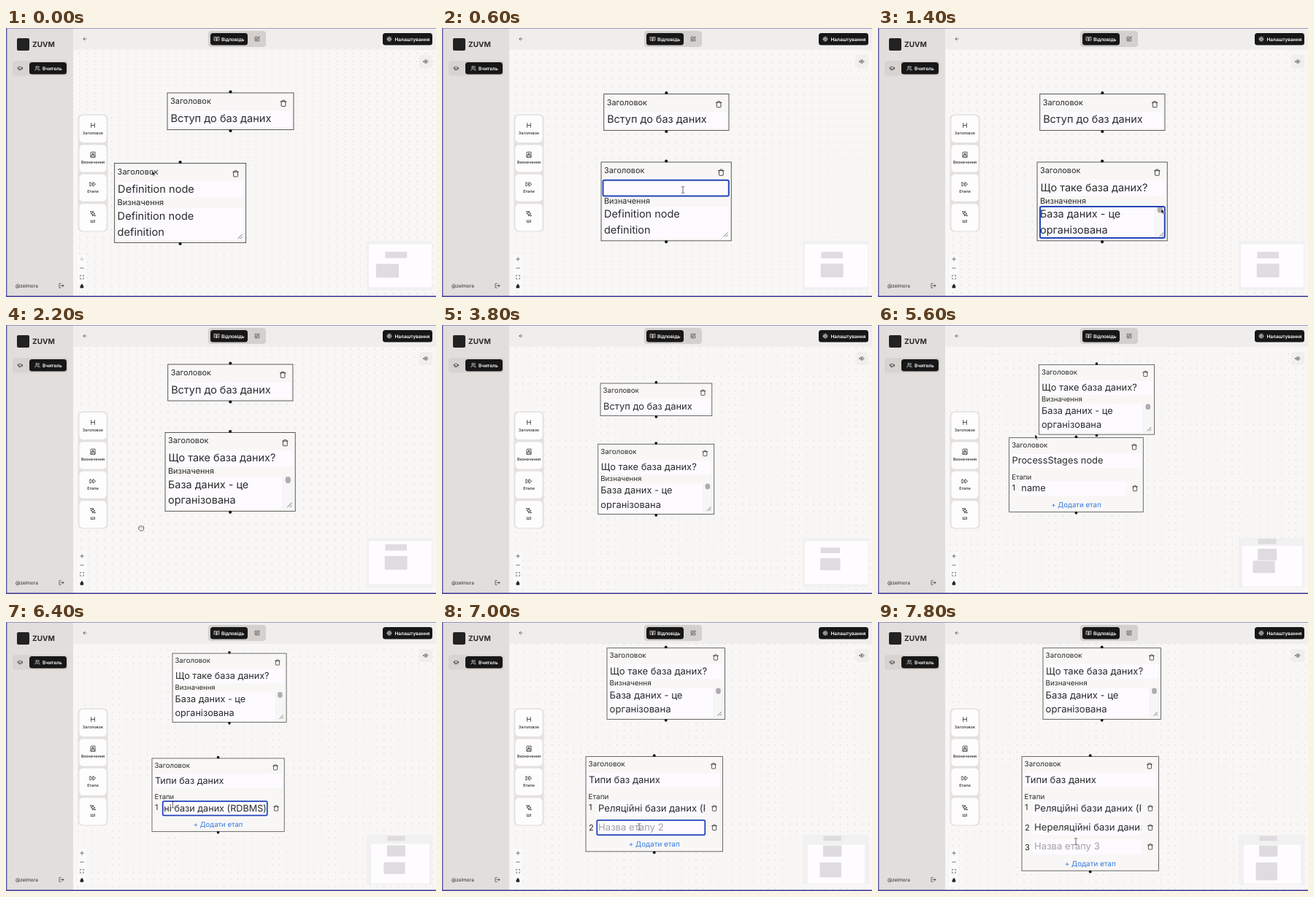
Write an HTML page that moves like this. It is 589 by 369 pixels and loops after 8 s.

```html
<!DOCTYPE html>
<html lang="uk">
<head>
<meta charset="utf-8">
<title>Node editor</title>
<style>
  html, body { margin: 0; width: 100%; height: 100%; overflow: hidden; background: #f8f7f6; }
  svg { display: block; }
  text { font-family: Inter, "Noto Sans", sans-serif; fill: #2a2a2a; white-space: pre; text-rendering: geometricPrecision; }
  .label { font-size: 11px; }
  .field { font-size: 14.6px; }
  .ui { font-size: 6.5px; font-weight: 600; }
  .tool { font-size: 5.5px; font-weight: 500; text-anchor: middle; }
</style>
</head>
<body>
<svg id="stage" width="589" height="369" viewBox="0 0 589 369">
  <defs>
    <pattern id="dots" width="11" height="11" patternUnits="userSpaceOnUse">
      <circle cx=".7" cy=".7" r=".55" fill="#b3b1b2"/>
    </pattern>
    <clipPath id="mapClip"><rect x="494" y="292" width="90" height="68"/></clipPath>
  </defs>
  <rect width="589" height="369" fill="#f8f7f6"/>
  <rect x="92" y="30" width="497" height="339" fill="url(#dots)"/>
  <g id="nodes"></g>
  <g id="chrome"></g>
  <g id="overlay"></g>
</svg>
<script>
const $ = id => document.getElementById(id);
const LOOP = 8000, STEP = 200;
const INK = '#222', FIELD = '#fdfbff', FOCUS = '#2444b8';

const circle = (x, y, r) => `M${x - r} ${y}a${r} ${r} 0 1 0 ${2 * r} 0a${r} ${r} 0 1 0 ${-2 * r} 0`;

// Icon outlines on a 24-unit grid
const ICONS = {
  back: 'M12 19l-7-7 7-7M19 12H5',
  heading: 'M6 12h12M6 20V4M18 20V4',
  definition: 'M4 19.5v-15A2.5 2.5 0 0 1 6.5 2H20v20H6.5a2.5 2.5 0 0 1 0-5H20M8 13l4-7 4 7M9 11h6',
  stages: 'M13 19l9-7-9-7zM2 19l9-7-9-7z',
  sparkles: 'M12 3l2 6 6 3-6 2-2 7-2-7-6-2 6-3zM5 3v4M3 5h4M19 17v4M17 19h4',
  cap: 'M22 10L12 5 2 10l10 5zM6 12v5c3 3 9 3 12 0M22 10v6',
  users: 'M16 21v-2a4 4 0 0 0-4-4H6a4 4 0 0 0-4 4v2M22 21v-2a4 4 0 0 0-3-4M16 3a4 4 0 0 1 0 8' + circle(9, 7, 4),
  book: 'M2 3h6a4 4 0 0 1 4 4v14a3 3 0 0 0-3-3H2zM22 3h-6a4 4 0 0 0-4 4v14a3 3 0 0 1 3-3h7zM6 8h2M6 12h2M16 8h2M16 12h2',
  edit: 'M12 3H5a2 2 0 0 0-2 2v14a2 2 0 0 0 2 2h14a2 2 0 0 0 2-2v-7M18.4 2.6a2 2 0 0 1 3 3L12 15l-4 1 1-4z',
  gear: circle(12, 12, 7) + circle(12, 12, 3) + 'M12 2v3M12 19v3M2 12h3M19 12h3M5 5l2 2M17 17l2 2M5 19l2-2M17 7l2-2',
  eye: 'M2 12s4-7 10-7 10 7 10 7-4 7-10 7-10-7-10-7z' + circle(12, 12, 3),
  logout: 'M9 21H5a2 2 0 0 1-2-2V5a2 2 0 0 1 2-2h4M16 17l5-5-5-5M21 12H9',
  plus: 'M4 12h16M12 4v16',
  minus: 'M4 12h16',
  expand: 'M3 8V3h5M16 3h5v5M21 16v5h-5M8 21H3v-5',
  lock: 'M5 11h14v10H5zM8 11V7a4 4 0 0 1 8 0v4',
  trash: 'M3 6h18M19 6v14a2 2 0 0 1-2 2H7a2 2 0 0 1-2-2V6M8 6V4a2 2 0 0 1 2-2h4a2 2 0 0 1 2 2v2'
};

const POINTERS = {
  arrow: '<path d="M0 0v6.5l1.5-1.4 1.1 2.3 1.1-.5-1-2.2h2z" fill="#111" stroke="#fff" stroke-width=".5"/>',
  hand: '<path d="M-3-1.5q0-2 1.5-1.5q1-1 2 0q1-1 2 .2q1.3-.3 1.2 1.3v2q-.4 3-3.2 3q-2.5 0-3.8-2.6q-.8-1.5.3-2.4z" fill="#fff" stroke="#333" stroke-width=".8"/><path d="M-1.5-1.5v1.5M.5-1.6v1.6M2.3-1.4v1.4" stroke="#333" stroke-width=".6"/>',
  ibeam: '<path d="M-2-4.5q2 0 2 1q0-1 2-1M-2 4.5q2 0 2-1q0 1 2 1M0-3.5v7" fill="none" stroke="#444" stroke-width=".8"/>',
  none: ''
};

const rect = (x, y, w, h, fill, rx = 0, extra = '') =>
  `<rect x="${x}" y="${y}" width="${w}" height="${h}" rx="${rx}" fill="${fill}" ${extra}/>`;
const text = (x, y, str, cls, extra = '') => `<text x="${x}" y="${y}" class="${cls}" ${extra}>${str}</text>`;
const icon = (name, cx, cy, size, color = INK, fill = 'none') =>
  `<path d="${ICONS[name]}" transform="translate(${cx - size / 2} ${cy - size / 2}) scale(${size / 24})"
    fill="${fill}" stroke="${color}" stroke-width="2" stroke-linecap="round" stroke-linejoin="round"/>`;

// Eased value of a list of [time, ...values] keys
function track(keys, t) {
  const next = keys.findIndex(key => key[0] > t);
  if (next < 0) return keys.at(-1).slice(1);
  if (next === 0) return keys[0].slice(1);
  const a = keys[next - 1], b = keys[next];
  const p = (t - a[0]) / (b[0] - a[0]), eased = p * p * (3 - 2 * p);
  return a.slice(1).map((v, i) => v + (b[i + 1] - v) * eased);
}

function typed(str, start, end, t, before = '') {
  if (t < start) return before;
  return str.slice(0, Math.round(str.length * Math.min(1, (t - start) / (end - start))));
}

const VIEW = [
  [0, 221, 89, 1], [400, 221.7, 90.5, .99], [1800, 221.7, 90.5, .99], [2200, 221.7, 54, .99],
  [3000, 217, 80, .883], [5000, 217, 80, .883], [5400, 221, -25, .883],
  [6000, 231.2, -38.8, .867], [6400, 231.2, -38.8, .867], [6800, 229.3, -49, .897]
];
const DEFINITION = [[0, -72.4, 96.5], [400, -3.7, 94.4]];
const PROCESS = [[5400, -64.2, 156.5], [5800, -36, 260.4]];
const POINTER = [
  [0, 200, 196, 'arrow'], [400, 270, 196, 'ibeam'], [600, 330, 222, 'ibeam'], [1000, 300, 262, 'ibeam'],
  [1400, 388, 248, 'arrow'], [1800, 190, 316, 'hand'], [2200, 185, 279, 'hand'], [2600, 190, 300, 'hand'],
  [3000, 190, 300, 'none'], [4000, 118, 215, 'arrow'], [4400, 118, 215, 'arrow'], [5000, 160.5, 186, 'hand'],
  [5400, 164, 82, 'hand'], [5600, 215, 150, 'arrow'], [5800, 240, 216, 'ibeam'], [6400, 228.5, 250.5, 'ibeam'],
  [6600, 290, 277, 'arrow'], [7000, 270, 281, 'ibeam'], [7400, 290, 304, 'arrow'], [7800, 271, 301, 'ibeam']
];

function input(x, y, w, h, str, { focused, placeholder } = {}) {
  const overflows = focused && str.length > 18;
  const body = str
    ? text(overflows ? w - 1 : 2, h - 6.7, str, 'field', overflows ? 'text-anchor="end"' : '')
    : text(2, h - 6.7, placeholder || '', 'field', 'style="fill:#a3a1a3"');
  return rect(x, y, w, h, FIELD, 2) +
    `<svg x="${x}" y="${y}" width="${w}" height="${h}">${body}</svg>` +
    (focused ? ring(x, y, w, h) : '');
}
const ring = (x, y, w, h) => rect(x, y, w, h, 'none', 2, `stroke="${FOCUS}" stroke-width="2"`);

function frame(w, h, title, focused) {
  const handle = y => `<circle cx="${w / 2}" cy="${y}" r="2.1" fill="#111"/>`;
  return rect(0, 0, w, h, '#f8f7f6', 0, 'stroke="#505050" stroke-width=".95"') +
    text(4, 15.2, 'Заголовок', 'label') + icon('trash', w - 14, 14.3, 10) +
    input(2.5, 25, w - 6, 22, title, { focused }) + handle(-1.5) + handle(h + 1.5);
}

function headingNode() {
  return { x: 0, y: 0, w: 173, h: 50.5, body: frame(173, 50.5, 'Вступ до баз даних') };
}

function definitionNode(t) {
  const [x, y] = track(DEFINITION, t), w = 180, h = 109;
  const title = typed('Що таке база даних?', 600, 1000, t, 'Definition node');
  const lines = typed('База даних - це\nорганізована', 1000, 1200, t, 'Definition node\ndefinition').split('\n');
  const body = frame(w, h, title, t >= 400 && t < 1000) +
    text(4, 57.3, 'Визначення', 'label') +
    rect(4, 61.6, 172.5, 43.6, FIELD) +
    lines.map((line, i) => text(4, 77 + 22 * i, line, 'field')).join('') +
    (t >= 1200
      ? rect(163, 62, 13.5, 43, '#f7f6f7', 0, 'stroke="#e9e8ea" stroke-width=".5"') +
        rect(166.3, 61.2, 7.4, 9, '#aeacaf', 3.6)
      : '') +
    '<path d="M169 103.5l6-6M172.5 103.5l2.5-2.5" stroke="#444" stroke-width=".8"/>' +
    (t >= 1000 && t < 1600 ? ring(4, 61.6, 172.5, 43.6) : '');
  return { x, y, w, h, body };
}

function processNode(t) {
  const [x, y] = track(PROCESS, t), w = 209;
  const stages = [
    typed('Реляційні бази даних (RDBMS)', 6000, 6400, t, 'name'),
    typed('Нереляційні бази даних (NoSQL)', 7000, 7400, t),
    ''
  ].slice(0, t >= 7600 ? 3 : t >= 6800 ? 2 : 1);
  const active = t >= 6000 && t < 6600 ? 0 : t >= 7000 && t < 7600 ? 1 : -1;
  const extra = 29.4 * (stages.length - 1), h = 115.8 + extra;
  const rows = stages.map((str, i) => {
    const top = 68 + 29.4 * i;
    return text(4.5, 82 + 30.7 * i, i + 1, 'field', 'style="font-size:12.5px"') +
      input(17, top, 165, 22.4, str, { focused: i === active, placeholder: `Назва етапу ${i + 1}` }) +
      icon('trash', 196.2, top + 11, 10);
  }).join('');
  const title = typed('Типи баз даних', 5800, 6000, t, 'ProcessStages node');
  const body = frame(w, h, title, t === 5800) + text(4, 65, 'Етапи', 'label') + rows +
    text(w / 2, 108.6 + extra, '+ Додати етап', 'label', 'text-anchor="middle" style="fill:#3478df"');
  return { x, y, w, h, body };
}

function minimap(nodes, [vx, vy, zoom]) {
  const top = Math.min(30, vy), height = 369 - top;
  const scale = Math.min(86 / 497, 65.5 / height);
  const mapX = x => 540 + (x - 340.5) * scale;
  const mapY = y => 326 + (y - top - height / 2) * scale;
  const boxes = nodes.map(n => rect(mapX(vx + n.x * zoom), mapY(vy + n.y * zoom),
    n.w * zoom * scale, n.h * zoom * scale, '#dedcdf')).join('');
  return `<g clip-path="url(#mapClip)">${rect(494, 292, 90, 68, '#f2f1f1')}${
    rect(mapX(92), mapY(30), 497 * scale, 339 * scale, '#fefcff')}${boxes}</g>`;
}

function pointer(t) {
  const kind = POINTER.findLast(key => key[0] <= t)[3];
  const [x, y] = track(POINTER.map(key => key.slice(0, 3)), t);
  return `<g transform="translate(${x} ${y})">${POINTERS[kind]}</g>`;
}

function chrome() {
  const tools = [['heading', 'Заголовок'], ['definition', 'Визначення'], ['stages', 'Етапи'], ['sparkles', 'ШІ']];
  const white = 'style="fill:#fff"';
  return rect(92, 0, 497, 30, '#f0eeed') + rect(0, 0, 92, 369, '#e1dedc') +
    rect(15, 14, 17, 17, INK, 2) +
    text(36, 26, 'ZUVM', '', 'style="font-size:10px;font-weight:700"') +
    rect(9, 45, 76, 20.5, '#d7d3d0', 4) + icon('cap', 19, 55.3, 8) +
    rect(32, 47, 51, 16.5, '#171717', 3.5) + icon('users', 43, 55.2, 7.5, '#fff') +
    text(50, 57.7, 'Вчитель', 'ui', white) +
    text(13, 356, '@zelmora', 'ui', 'style="font-weight:400"') + icon('logout', 76, 353.5, 8) +
    icon('back', 108, 15, 7) +
    rect(277, 4, 79, 22, '#d4d0cd', 4) + rect(280, 7, 51, 16.5, '#171717', 3.5) +
    icon('book', 288.5, 15.2, 7.5, '#fff') + text(295, 17.6, 'Відповідь', 'ui', white) + icon('edit', 344, 15, 7.5) +
    rect(516, 7, 68, 16.5, '#171717', 3.5) + icon('gear', 525, 15.2, 8, '#fff') +
    text(532.5, 17.6, 'Налаштування', 'ui', white) +
    rect(566, 37, 18, 18, '#f1efee', 4) + icon('eye', 575, 46, 7.5) +
    rect(98.5, 118.5, 41, 161, '#e4e1df', 6) +
    tools.map(([name, label], i) => {
      const y = 120 + 40.4 * i;
      return rect(100.5, y, 37, 37, '#fefdfe', 5) + icon(name, 119, y + 13.5, 9) + text(119, y + 25.6, label, 'tool');
    }).join('') +
    rect(98.5, 311, 11, 49, '#fbfafa') +
    icon('minus', 104, 329.3, 7) + icon('expand', 104, 341.8, 6.5) + icon('lock', 104, 354, 6.5, INK, INK) +
    rect(0, 0, 1.4, 369, '#5d57a6') + rect(0, 0, 589, .7, '#7a76b8') + rect(0, 367.4, 589, 1.6, '#45419a');
}

function render(t) {
  const view = track(VIEW, t), [vx, vy, zoom] = view;
  const nodes = [headingNode(), definitionNode(t)];
  if (t >= 4400) nodes.push(processNode(t));
  $('dots').setAttribute('patternTransform', `translate(${vx} ${vy}) scale(${zoom})`);
  $('nodes').setAttribute('transform', `translate(${vx} ${vy}) scale(${zoom})`);
  $('nodes').innerHTML = nodes.map(n => `<g transform="translate(${n.x} ${n.y})">${n.body}</g>`).join('');
  $('overlay').innerHTML = icon('plus', 104, 317, 7, zoom === 1 ? '#a5a3a3' : INK) + minimap(nodes, view) + pointer(t);
}

let shown = -1;
function tick() {
  const t = Math.floor(performance.now() % LOOP / STEP) * STEP;
  if (t !== shown) render(shown = t);
  requestAnimationFrame(tick);
}
$('chrome').innerHTML = chrome();
tick();
</script>
</body>
</html>
```
